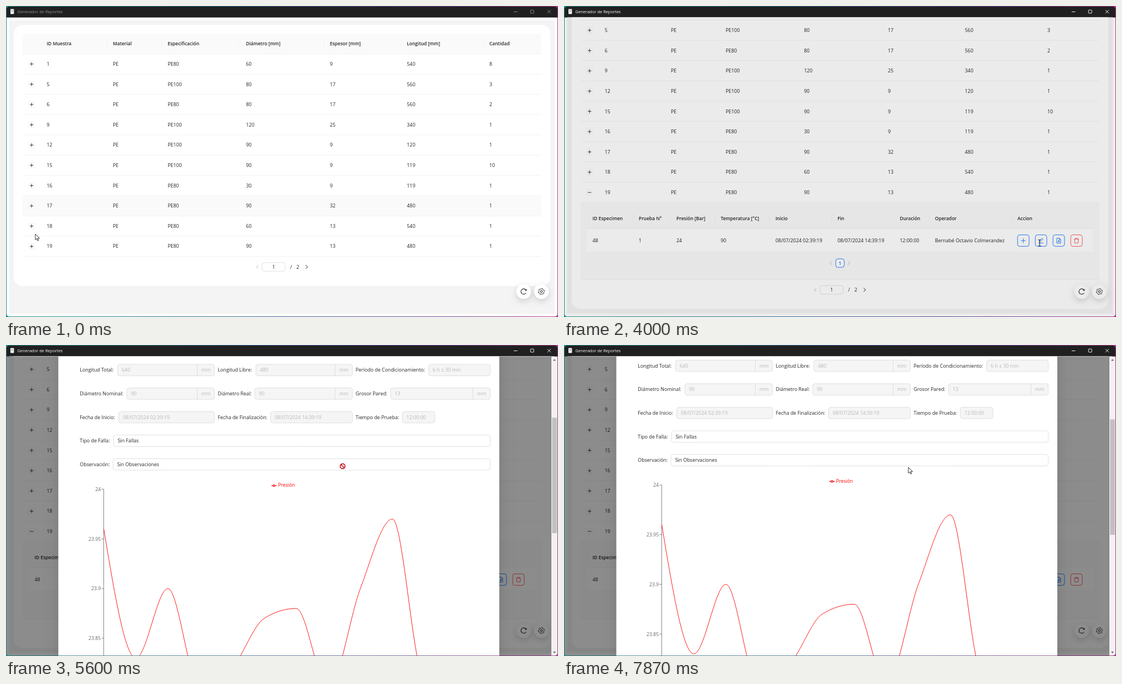
An HTML page with a canvas for the animation above (8 s loop, 997 px wide and 562 px high).

```html
<!DOCTYPE html>
<html lang="es">
<head>
<meta charset="utf-8">
<title>Generador de Reportes</title>
<style>
html, body { margin: 0; width: 100%; height: 100%; overflow: hidden; background: #202020; }
canvas { display: block; width: 997px; height: 562px; }
</style>
</head>
<body>
<canvas id="stage" width="997" height="562"></canvas>
<script>
const ctx = document.getElementById('stage').getContext('2d');
const LOOP = 8000, STEP = 1000 / 15;
const INK = '#262626', BLUE = '#1677ff', LIGHT_BLUE = '#69b1ff', RED = '#ff4d4f';
const LINE = '#f0f0f0', BORDER = '#d9d9d9', MUTED = 'rgba(0,0,0,.25)';
const OPERATOR = 'Bernabé Octavio Colmerandez';

// Moments of the session
const EXPAND = 400, BLUR = 3350, OPEN = 3930, MASK = 3966, ZOOM = 4001, FOCUS = 4300;

const clamp = (v, a = 0, b = 1) => Math.max(a, Math.min(b, v));
const easeOut = p => 1 - (1 - clamp(p)) ** 2;
const smooth = p => (p = clamp(p), p * p * (3 - 2 * p));

// ---------- drawing helpers ----------
function text(s, x, y, { size = 8.87, color = INK, weight = 400, align = 'left' } = {}) {
  ctx.font = `${weight} ${size}px "Open Sans", "Noto Sans", sans-serif`;
  ctx.fillStyle = color;
  ctx.textAlign = align;
  ctx.fillText(s, x, y + size * 0.36);
}
const bold = (s, x, y) => text(s, x, y, { size: 8.45, weight: 600 });

function rect(x, y, w, h, color) {
  ctx.fillStyle = color;
  ctx.fillRect(x, y, w, h);
}
function box(x, y, w, h, r, fill, stroke, lw = 0.8) {
  ctx.beginPath();
  ctx.roundRect(x, y, w, h, r);
  if (fill) { ctx.fillStyle = fill; ctx.fill(); }
  if (stroke) { ctx.strokeStyle = stroke; ctx.lineWidth = lw; ctx.stroke(); }
}
function path(d, x, y, { stroke, fill, lw = 1, scale = 1 } = {}) {
  const p = new Path2D(d);
  ctx.save();
  ctx.translate(x, y);
  ctx.scale(scale, scale);
  if (fill) { ctx.fillStyle = fill; ctx.fill(p); }
  if (stroke) { ctx.strokeStyle = stroke; ctx.lineWidth = lw; ctx.stroke(p); }
  ctx.restore();
}
function disc(x, y, r, fill, stroke, lw = 1) {
  ctx.beginPath();
  ctx.arc(x, y, r, 0, Math.PI * 2);
  if (fill) { ctx.fillStyle = fill; ctx.fill(); }
  if (stroke) { ctx.strokeStyle = stroke; ctx.lineWidth = lw; ctx.stroke(); }
}
function withShadow(color, blur, dy, draw) {
  ctx.save();
  ctx.shadowColor = color;
  ctx.shadowBlur = blur;
  ctx.shadowOffsetY = dy;
  draw();
  ctx.restore();
}
const chevron = (x, y, dir, color) =>
  path(`M${-1.8 * dir} -3.2L${1.8 * dir} 0L${-1.8 * dir} 3.2`, x, y, { stroke: color });

// ---------- motion ----------
const TICK = 200 / 3;
const wheel = (t, starts, d = TICK) =>
  starts.reduce((sum, s) => sum + d * easeOut((t - s) / 220), 0);

const pageScroll = t => wheel(t, [1500]) + wheel(t, [1600], 30.8);
function modalScroll(t) {
  const down = wheel(t, [4940, 5110, 5290, 5460, 5650, 6030, 6134, 6238, 6342, 6452, 6552, 6900]);
  return down - 534.5 * smooth((t - 7480) / 386);
}

const CURSOR = [
  [0, 53, 412], [270, 45, 435], [530, 47, 435], [800, 130, 412], [1400, 564, 415], [1733, 564, 415],
  [2600, 800, 431], [3100, 856, 427], [3600, 858, 428], [4000, 859, 428], [4200, 846, 418],
  [4400, 816, 395], [4530, 800, 380], [4666, 608, 219], [7730, 608, 219], [7866, 622, 221]
];
function cursorAt(t) {
  let i = CURSOR.findIndex(k => k[0] > t);
  if (i < 0) return CURSOR.at(-1).slice(1);
  const [t0, x0, y0] = CURSOR[i - 1], [t1, x1, y1] = CURSOR[i];
  const p = (t - t0) / (t1 - t0);
  return [x0 + (x1 - x0) * p, y0 + (y1 - y0) * p];
}
function cursorKind(t) {
  if (t >= 2950 && t < OPEN) return 'hand';
  if (t >= OPEN && t < 4100) return 'beam';
  if (t >= 4660 && t < 7730) return 'no';
  return (t >= 200 && t < 560) ? 'hand' : 'arrow';
}
function drawCursor(t) {
  const [x, y] = cursorAt(t), kind = cursorKind(t);
  if (kind === 'arrow') {
    path('M0 0V10.6L2.5 8.3L4.1 12.1L5.8 11.4L4.2 7.8H7.6Z', x, y, { fill: '#fff', stroke: '#000', lw: 0.8 });
  } else if (kind === 'hand') {
    path('M-1 0.4Q0 -0.8 1 0.4V4L5.5 5Q6.6 5.3 6.4 6.6L5.6 11H-0.6L-3.6 6.6Q-3.8 5.2 -2.4 5.6L-1 7Z', x, y,
      { fill: '#fff', stroke: '#000', lw: 0.8 });
  } else if (kind === 'beam') {
    path('M-2.4 -5.5H-.6L0 -5L.6 -5.5H2.4M0 -5V5M-2.4 5.5H-.6L0 5L.6 5.5H2.4', x, y, { stroke: '#111' });
  } else {
    disc(x, y, 4.5, '#fff', '#fff', 2.6);
    disc(x, y, 4.4, null, '#c80f1e', 1.6);
    path('M-3 -3L3 3', x, y, { stroke: '#c80f1e', lw: 1.6 });
  }
}

// ---------- window ----------
function drawFrame() {
  const g = ctx.createLinearGradient(0, 0, 997, 0);
  g.addColorStop(0, '#1d8a86');
  g.addColorStop(0.45, '#2b5f8e');
  g.addColorStop(0.8, '#6b3a8c');
  g.addColorStop(1, '#b0368f');
  ctx.fillStyle = g;
  ctx.fillRect(0, 0, 997, 562);
}
function drawTitle(active) {
  const c = active ? '#fff' : '#929292';
  box(0.8, 0.8, 995.4, 24, [5, 5, 0, 0], '#202020');
  box(8, 5.6, 6.4, 8.8, 1, '#f4f4f4');
  rect(9.3, 7.6, 3.8, 0.7, '#888');
  rect(9.3, 9.4, 3.8, 0.7, '#888');
  text('Generador de Reportes', 20.5, 10.6, { size: 7.5, color: c });
  rect(917, 10, 6.6, 0.9, c);
  box(947.4, 7.2, 5.8, 5.8, 0.8, null, c, 0.9);
  path('M-3.1 -3.1L3.1 3.1M3.1 -3.1L-3.1 3.1', 981, 10.2, { stroke: c, lw: 0.9 });
}
function drawScrollbar(scroll, height) {
  rect(985, 21, 11, 540.5, '#f1f1f1');
  rect(986.3, 32 + scroll / height * 517, 8.8, 541 / height * 517, '#c1c1c1');
  path('M-2.6 1.3L0 -1.3L2.6 1.3Z', 990.6, 27, { fill: scroll > 0.5 ? '#505050' : '#a3a3a3' });
  path('M-2.6 -1.3L0 1.3L2.6 -1.3Z', 990.6, 555.5, { fill: '#505050' });
}

// ---------- page ----------
const HEAD = ['ID Muestra', 'Material', 'Especificación', 'Diámetro [mm]', 'Espesor [mm]', 'Longitud [mm]', 'Cantidad'];
const COLS = { wide: [73.5, 193, 292, 433.5, 585, 724, 873], narrow: [73.5, 191.5, 289.5, 429, 579, 716, 863.5] };
const ROWS = [
  '1 PE PE80 60 9 540 8', '5 PE PE100 80 17 560 3', '6 PE PE80 80 17 560 2', '9 PE PE100 120 25 340 1',
  '12 PE PE100 90 9 120 1', '15 PE PE100 90 9 119 10', '16 PE PE80 30 9 119 1', '17 PE PE80 90 32 480 1',
  '18 PE PE80 60 13 540 1', '19 PE PE80 90 13 480 1'
].map(r => r.split(' '));
const SUB_HEAD = ['ID Especimen', 'Prueba N°', 'Presión [Bar]', 'Temperatura [°C]', 'Inicio', 'Fin', 'Duración', 'Operador', 'Accion'];
const SUB_ROW = ['48', '1', '24', '90', '08/07/2024 02:39:19', '08/07/2024 14:39:19', '12:00:00', OPERATOR];
const SUB_COLS = {
  wide: [51.5, 135, 203, 283, 382, 494, 606.5, 670, 819],
  narrow: [51.5, 133.5, 201, 280, 378, 489, 600, 662.5, 810]
};
const ACTIONS = [
  'M-4.4 0H4.4M0 -4.4V4.4',
  'M-4.4 4.3H4.4M-2.9 1.9L-2.5 -.2L1.9 -4.3L3.5 -2.7L-.9 1.5Z',
  'M-3.5 -4.6H1L3.5 -2V4.6H-3.5ZM1 -4.6V-2H3.5M-1.6 2.8Q.4 .6 0 -1.2Q.2 1.2 2 1.4Q0 1.2 -1.6 2.8',
  'M-4.4 -2.7H4.4M-1.7 -2.7V-4.3H1.7V-2.7M-3.4 -2.7L-3 4.3H3L3.4 -2.7'
];

function hoverRow(t) {
  if (t < 130) return 7;
  if (t < 700) return 9;
  return t < 1850 ? 8 : -1;
}
function header(labels, cols, y) {
  labels.forEach((s, i) => {
    bold(s, cols[i], y);
    if (i) rect(cols[i] - 11, y - 7.5, 0.8, 15, LINE);
  });
}
function expander(y, open, blue) {
  const c = blue ? LIGHT_BLUE : INK;
  box(40.8, y - 5.3, 10.8, 10.8, 3, '#fff', blue ? LIGHT_BLUE : LINE);
  path(open ? 'M-3.2 0H3.2' : 'M-3.2 0H3.2M0 -3.2V3.2', 46.2, y + 0.1, { stroke: c, lw: 0.9 });
}
function drawDetails(t, mode, right) {
  const cols = SUB_COLS[mode];
  rect(30, 453, right - 30, 139, '#fafafa');
  rect(30, 591.6, right - 30, 0.8, LINE);
  header(SUB_HEAD, cols, 481.5);
  rect(40.5, 500.3, right - 51.5, 42, '#fff');
  rect(40.5, 499.8, right - 51.5, 0.7, LINE);
  rect(40.5, 542, right - 51.5, 0.7, LINE);
  SUB_ROW.forEach((s, i) => text(s, cols[i], 521.5));
  ACTIONS.forEach((d, i) => {
    const x = cols[8] + 10.6 + i * 32;
    const hot = i === 1 && t >= 2950 && t < OPEN;
    const c = i === 3 ? RED : hot ? LIGHT_BLUE : BLUE;
    box(x - 10.4, 511, 20.8, 20.8, 4, '#fff', c, 0.9);
    path(d, x, 521.5, { stroke: c, lw: 0.9 });
  });
  const mid = (right + 30) / 2;
  box(mid - 7.7, 554.4, 15.3, 15.3, 4, '#fff', BLUE, 0.9);
  text('1', mid, 562, { color: BLUE, weight: 600, align: 'center' });
  chevron(mid - 16.3, 562, -1, '#bfbfbf');
  chevron(mid + 16, 562, 1, '#bfbfbf');
}
function drawPager(y, dx) {
  chevron(454 + dx, y, -1, '#bfbfbf');
  box(462.4 + dx, y - 7.7, 42, 15.4, 4, '#fff', BORDER);
  text('1', 483.5 + dx, y, { align: 'center' });
  text('/', 514.8 + dx, y, { align: 'center' });
  text('2', 527 + dx, y, { align: 'center' });
  chevron(543 + dx, y, 1, INK);
}
function gearPath() {
  let d = '';
  for (let i = 0; i < 24; i++) {
    const a = (i + 0.5) * Math.PI / 12, r = i % 4 < 2 ? 5.6 : 4.4;
    d += `${i ? 'L' : 'M'}${(Math.sin(a) * r).toFixed(2)} ${(-Math.cos(a) * r).toFixed(2)}`;
  }
  return d + 'Z';
}
const GEAR = gearPath();
function drawFloats(dx) {
  for (const x of [935, 967])
    withShadow('rgba(0,0,0,.16)', 12, 4, () => disc(x + dx, 516, 13.3, '#fff'));
  path('M4.3 2.4A4.9 4.9 0 1 1 3.9 -3', 935 + dx, 516, { stroke: INK, lw: 1.1 });
  path('M5.4 -4.7V-1.3L2 -1.9Z', 935 + dx, 516, { fill: INK });
  path(GEAR, 967 + dx, 516, { stroke: INK, lw: 1 });
  disc(967 + dx, 516, 1.9, null, INK, 1);
}
function drawPage(t) {
  const open = t >= EXPAND, mode = open && t < OPEN ? 'narrow' : 'wide';
  const narrow = mode === 'narrow', cut = narrow ? 11.2 : 0;
  const right = 967 - cut, extra = open ? 139 : 0, scroll = pageScroll(t);
  rect(1, 20.5, 995, 540.7, '#fff');
  ctx.save();
  ctx.translate(0, -scroll);
  rect(6, 26, 985 - cut, open ? 627 : 530, '#f4f4f4');
  box(14, 34, 969 - cut, 472 + extra, 16, '#fff');
  box(30, 50, right - 30, 36.5, [5, 5, 0, 0], '#fafafa');
  header(HEAD, COLS[mode], 68.2);
  rect(30, 86, right - 30, 0.8, LINE);
  ROWS.forEach((row, i) => {
    const top = 86.5 + 36.62 * i, y = top + 18.2, last = i === 9;
    if (i === hoverRow(t)) rect(30, top, right - 30, 36.6, '#fafafa');
    rect(30, top + 36.1, right - 30, 0.8, LINE);
    expander(y, last && open, last && t >= 200 && t < BLUR);
    row.forEach((s, j) => text(s, COLS[mode][j], y));
  });
  if (open) drawDetails(t, mode, right);
  drawPager(471.5 + extra, narrow ? -5.7 : 0);
  ctx.restore();
  drawFloats(-cut);
  if (narrow) drawScrollbar(scroll, 638.5);
}

// ---------- dialog ----------
const LEFT = [133.3, 382.5, 631.5], RIGHT = [377, 626, 875];
// Each field: label, input x, value, unit, unit x
const FIELDS = [
  [['Estándar', 177.5, 'ISO 1167-1996'], ['Material', 425, 'PE'], ['Especificación', 697.5, 'PE80']],
  [['Tapa de Extremo', 210, 'Tipo A'], ['Entorno', 424, 'Agua'], ['Cantidad de Especimenes', 745.5, '1']],
  [['Hoop Stress', 191.5, '', 'Bar', 348.5], ['Presión', 421.5, '24', 'Bar', 597.5], ['Temperatura', 692, '90', '°C', 850.5]],
  [['Longitud Total', 201.3, '640', 'mm', 345.5], ['Longitud Libre', 451, '480', 'mm', 594.5], ['Período de Condicionamiento', 763, '6 h ± 30 min']],
  [['Diámetro Nominal', 218, '90', 'mm', 345.5], ['Diámetro Real', 449, '90', 'mm', 594.5], ['Grosor Pared', 694.3, '13', 'mm', 843.5]],
  [['Fecha de Inicio', 203.3, '08/07/2024 02:39:19'], ['Fecha de Finalización', 477.5, '08/07/2024 14:39:19'], ['Tiempo de Prueba', 715.5, '12:00:00']]
];
const rowY = i => 132.6 + 42.62 * i;

function input(label, lx, x0, x1, y, value, { off, focus, unit, ux } = {}) {
  text(label + ':', lx, y);
  box(x0 + 0.3, y - 10.3, x1 - x0 - 0.6, 20.7, 4, off ? '#f5f5f5' : '#fff', focus ? BLUE : BORDER);
  text(value, x0 + 7.7, y, { color: off ? MUTED : INK });
  if (unit) {
    rect(ux - 0.4, y - 10.3, 0.8, 20.7, BORDER);
    text(unit, (ux + x1) / 2, y, { color: MUTED, align: 'center' });
  }
}
function drawForm(t) {
  input('Nombre de la Prueba', LEFT[0], 230, 626, rowY(0), 'Puebra de Resistencia a Presión Constante');
  input('Operador', LEFT[2], 679.5, 875, rowY(0), OPERATOR);
  FIELDS.forEach((row, i) => row.forEach(([label, x, value, unit, ux], j) => {
    const end = label === 'Tiempo de Prueba' ? 775 : RIGHT[j];
    input(label, LEFT[j], x, end, rowY(i + 1), value, { off: true, unit, ux });
  }));
  input('Tipo de Falla', LEFT[0], 194, 875, rowY(7), 'Sin Fallas', { focus: t >= FOCUS && t < 4600 });
  input('Observación', LEFT[0], 193, 875, rowY(8), 'Sin Observaciones');
}

const CHARTS = [
  { name: 'Presión', color: '#ff0000', top: 518.5, legendX: 484, max: 24, step: 0.05,
    data: [23.96, 23.83, 23.9, 23.8, 23.82, 23.87, 23.88, 23.8, 23.9, 23.97, 23.81, 23.82, 23.81] },
  { name: 'Temperatura', color: '#0d5cf5', top: 919.2, legendX: 473.5, max: 89.955, step: 0.045,
    data: [89.93, 89.92, 89.8, 89.85, 89.92, 89.85, 89.79, 89.79, 89.8, 89.8, 89.88, 89.86, 89.9] }
];
const X0 = 176.6, DX = 57.93, DY = 89.75;

// Monotone cubic through evenly spaced points
function curve(ys) {
  const n = ys.length - 1;
  const s = ys.slice(1).map((y, i) => y - ys[i]);
  const m = ys.map((_, i) => {
    if (i === 0 || i === n) return 0;
    const a = s[i - 1], b = s[i];
    return (Math.sign(a) + Math.sign(b)) * Math.min(Math.abs(a), Math.abs(b), Math.abs(a + b) / 4);
  });
  m[0] = (3 * s[0] - m[1]) / 2;
  m[n] = (3 * s[n - 1] - m[n - 1]) / 2;
  ctx.beginPath();
  ctx.moveTo(X0, ys[0]);
  for (let i = 0; i < n; i++) {
    const x = X0 + DX * i;
    ctx.bezierCurveTo(x + DX / 3, ys[i] + m[i] / 3, x + DX * 2 / 3, ys[i + 1] - m[i + 1] / 3, x + DX, ys[i + 1]);
  }
}
function drawChart({ name, color, top, legendX, max, step, data }) {
  const grey = '#666', base = top + DY * 4;
  path('M-4.7 0H4.7', legendX, top - 6.5, { stroke: color, lw: 1.3 });
  disc(legendX, top - 6.5, 1.6, '#fff', color, 1.2);
  text(name, legendX + 7.6, top - 7.3, { size: 8.6, color });
  rect(X0 - 0.4, top, 0.8, DY * 4, grey);
  rect(X0, base - 0.4, DX * 12, 0.8, grey);
  for (let i = 0; i < 5; i++) {
    const y = top + DY * i;
    rect(X0 - 4, y - 0.4, 4, 0.8, grey);
    text(String(+(max - step * i).toFixed(3)), X0 - 5.4, y + 0.2, { size: 8.7, color: grey, align: 'right' });
  }
  for (let i = 0; i <= 12; i++) {
    rect(X0 + DX * i - 0.4, base, 0.8, 4, grey);
    text(String(i), X0 + DX * i, base + 9.2, { color: grey, align: 'center' });
  }
  text('Tiempo [Hora]', X0 + DX * 6, base + 17.2, { color: '#808080', align: 'center' });
  curve(data.map(v => top + (max - v) / step * DY));
  ctx.strokeStyle = color;
  ctx.lineWidth = 0.9;
  ctx.stroke();
}
function drawDialog(t) {
  const p = clamp((t - ZOOM) / 300);
  if (p <= 0) return;
  const e = 1 - (1 - p) ** 4, scale = 0.2 + 0.8 * e, scroll = modalScroll(t);
  ctx.save();
  ctx.globalAlpha = e;
  ctx.translate(861, 424);
  ctx.scale(scale, scale);
  ctx.translate(-861, -424 - scroll);
  withShadow('rgba(0,0,0,.13)', 24, 6, () => box(94.5, 87, 796.5, 1259, 5.3, '#fff'));
  disc(118, 108.5, 7.4, BLUE);
  rect(117.4, 107.2, 1.3, 4.8, '#fff');
  rect(117.4, 104.8, 1.3, 1.4, '#fff');
  text('Prueba Nro.: 1 [ID: 48]', 133.3, 108.8, { size: 9.85, weight: 600 });
  path('M-3.8 -3.8L3.8 3.8M3.8 -3.8L-3.8 3.8', 872.4, 105.8, { stroke: '#777', lw: 0.9 });
  drawForm(t);
  CHARTS.forEach(drawChart);
  ctx.restore();
  drawScrollbar(scroll, 1341);
}

// ---------- loop ----------
function render(t) {
  drawFrame();
  ctx.save();
  ctx.beginPath();
  ctx.roundRect(0.9, 0.9, 995.2, 560.3, 5);
  ctx.clip();
  drawTitle(t >= 330);
  ctx.save();
  ctx.beginPath();
  ctx.rect(0, 20.5, 997, 541.5);
  ctx.clip();
  drawPage(t);
  const shade = 0.45 * clamp((t - MASK) / 200);
  if (shade) rect(0, 20.5, 997, 541.5, `rgba(0,0,0,${shade})`);
  drawDialog(t);
  ctx.restore();
  drawCursor(t);
  ctx.restore();
}
function frame() {
  const t = performance.now() % LOOP;
  render(Math.min(Math.floor((t + 5) / STEP), 119) * STEP);
  requestAnimationFrame(frame);
}
frame();
</script>
</body>
</html>
```
